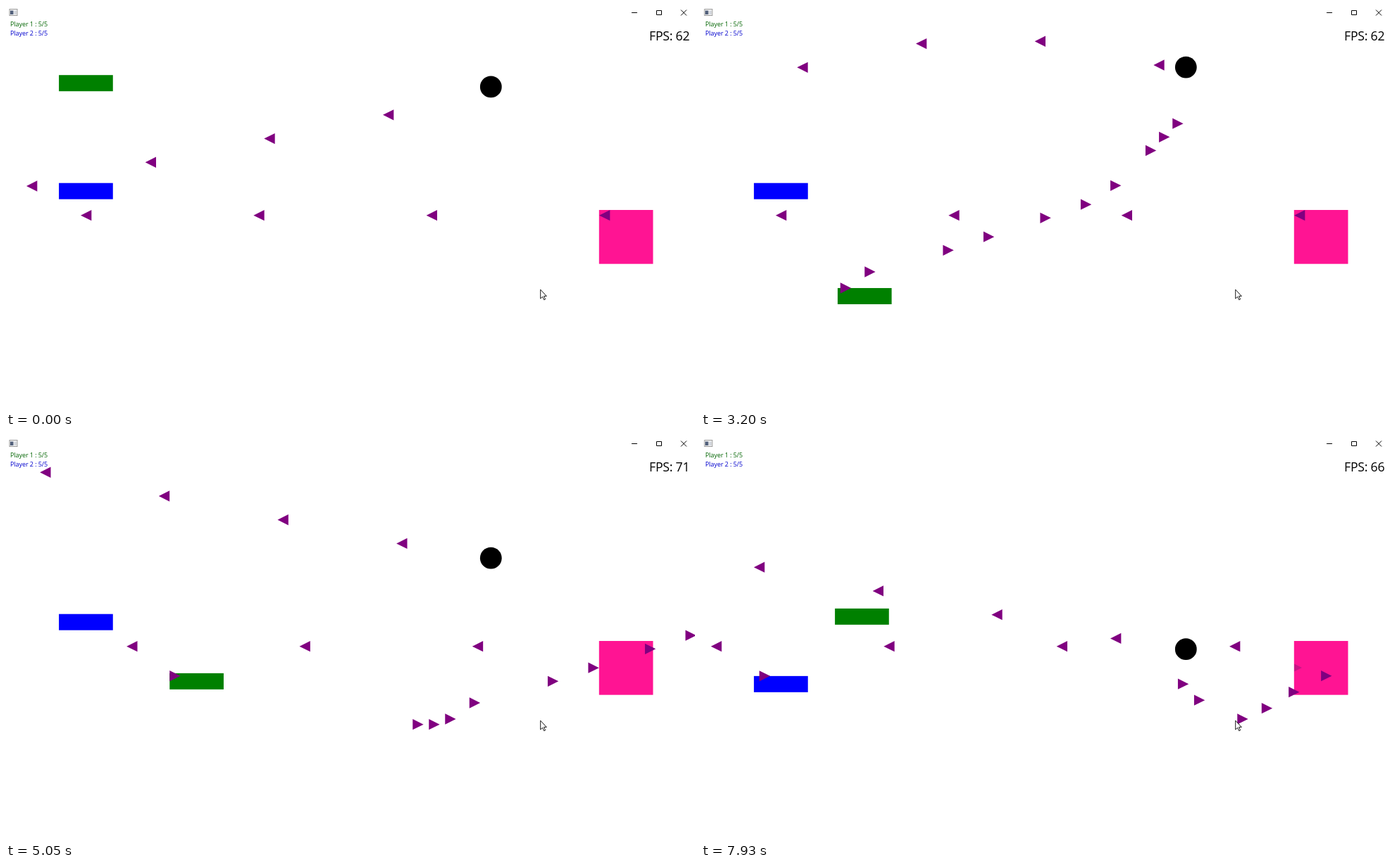
An HTML page for the animation above (8000 ms loop, 978 by 573 pixels).

```html
<!DOCTYPE html>
<html lang="en">
<head>
<meta charset="utf-8">
<title>Shooter</title>
<style>
  html, body { margin: 0; width: 100%; height: 100%; overflow: hidden; background: #fff; }
  svg { display: block; width: 978px; height: 573px; }
  text { font-family: "Open Sans", "Noto Sans", sans-serif; }
  .score { font-size: 9px; letter-spacing: -.07px; }
  .fps { font-size: 17.6px; letter-spacing: -.2px; }
  .button { fill: none; stroke: #000; stroke-width: 1; }
</style>
</head>
<body>
<svg viewBox="0 0 978 573">
  <rect x="841.8" y="290" width="76.67" height="76.67" fill="#ff1493"/>
  <path id="stain" d="M842 322.5L853 328L842 333.5Z" fill="#c71585"/>
  <path id="stamp" d="M842 297.6L857.3 290V305.3Z" fill="#870a88"/>
  <rect id="green" width="76.67" height="23" fill="#008000"/>
  <rect id="blue" width="76.67" height="23" fill="#00f"/>
  <circle id="ball" cx="688.3" r="15.4"/>
  <path id="bullets" fill="#800080"/>

  <rect width="978" height="21" fill="#fff"/>
  <rect x="5" y="4.5" width="11" height="9" fill="#f4f4f4" stroke="#9a9a9a"/>
  <rect x="6" y="6.5" width="4.5" height="5.5" fill="#53617c"/>
  <rect x="11.5" y="6.5" width="3.5" height="5.5" fill="#d4d8de"/>
  <path class="button" d="M888 9.5H896M923.5 6.5H930.5V12.5H923.5Z"/>
  <path class="button" d="M958 5.5L966 13.5M966 5.5L958 13.5"/>

  <text class="score" x="6" y="29.3" fill="#006400">Player 1 : 5/5</text>
  <text class="score" x="6" y="41.5" fill="#0000cd">Player 2 : 5/5</text>
  <text class="fps" id="fps" x="913" y="49.3"></text>
  <path d="M758.7 403.2V416L761.6 413.3L763.7 417.8L765.6 416.9L763.5 412.6H767.3Z"
        fill="#fff" stroke="#000" stroke-width=".9"/>
</svg>
<script>
const LOOP = 8000;
const REFRESH = 68.5;     // ms between drawn pictures
const STEP = 23 / 6;      // pixels moved per game tick
const SIZE = 4 * STEP;    // bullet size
const $ = id => document.getElementById(id);
const clamp = (value, low, high) => Math.min(high, Math.max(low, value));

// Turning points of the green player: tick, steps right, steps down.
const turns = [
  [0, 0, 0], [20, 0, 0], [43, 22.4, 0], [82, 24, 38.9], [94, 24, 46], [145, 24, 63],
  [180, 30, 71], [191, 30.5, 78.6], [215, 31, 79], [262, 38, 56], [292, 41, 56],
  [338, 41, 80], [380, 41, 40], [404, 41, 40], [412, 33, 40], [418, 30, 38]
];
// Ticks at which the green player presses fire.
const greenShots = [59, 64, 69, 83, 94, 109, 130, 145, 180, 189, 196, 202,
  302, 314, 324, 333, 349, 355];
const blueShots = [469];
const fpsReadings = [62, 71, 76, 83, 66];

// Game ticks per picture drop slightly once the screen gets busy.
const tickAt = picture => Math.round(4.09 * picture + 4.2 - .09 * Math.max(0, picture - 83));

const player = (right, down, top) => ({ x: 75.1 + STEP * right, y: top + STEP * down });

function greenAt(tick) {
  const next = turns.findIndex(turn => turn[0] > tick);
  const b = turns.at(next), a = next < 0 ? b : turns[next - 1];
  const part = a === b ? 0 : (tick - a[0]) / (b[0] - a[0]);
  const steps = i => Math.round(a[i] + (b[i] - a[i]) * part);
  return player(steps(1), steps(2), 98.2);
}
const blueAt = tick => player(0, clamp(tick - 448, 0, 23), 251.7);
const ballAt = tick => 27.4 + STEP / 5 * Math.abs(tick - 114.2);

// Triangle from its left edge and top; direction 1 points right, -1 left.
function triangle(x, y, direction) {
  const base = direction > 0 ? x : x + SIZE;
  return `M${base} ${y}l${direction * SIZE} ${SIZE / 2}l${-direction * SIZE} ${SIZE / 2}Z`;
}

function playerShots(shots, place, tick) {
  return shots.filter(shot => tick > shot).map(shot => {
    const { x, y } = place(shot);
    return triangle(x + STEP * (tick - shot - 1), y, 1);
  }).join("");
}

function enemyShots(tick) {
  let d = "";
  for (let age = tick % 64; age < 240; age += 64) d += triangle(842 - STEP * age, 290, -1);
  for (let shot = -218; shot <= tick - 2; shot += 44) {
    d += triangle(696 - STEP * (tick - shot), ballAt(shot), -1);
  }
  return d;
}

function place(id, { x, y }) {
  $(id).setAttribute("x", x);
  $(id).setAttribute("y", y);
}
const show = (id, visible) => { $(id).style.display = visible ? "" : "none"; };

function draw(time) {
  const tick = tickAt(Math.floor((time - 40) / REFRESH));
  place("green", greenAt(tick));
  place("blue", blueAt(tick));
  $("ball").setAttribute("cy", ballAt(tick));
  $("bullets").setAttribute("d", enemyShots(tick)
    + playerShots(greenShots, greenAt, tick) + playerShots(blueShots, blueAt, tick));
  show("stain", tick >= 306);
  show("stamp", tick >= 384 && tick < 448);
  $("fps").textContent = "FPS: " + fpsReadings[clamp(Math.floor((time - 105) / 1000) - 3, 0, 4)];
}

const begin = performance.now();
function loop() {
  draw((performance.now() - begin) % LOOP);
  requestAnimationFrame(loop);
}
loop();
</script>
</body>
</html>
```
